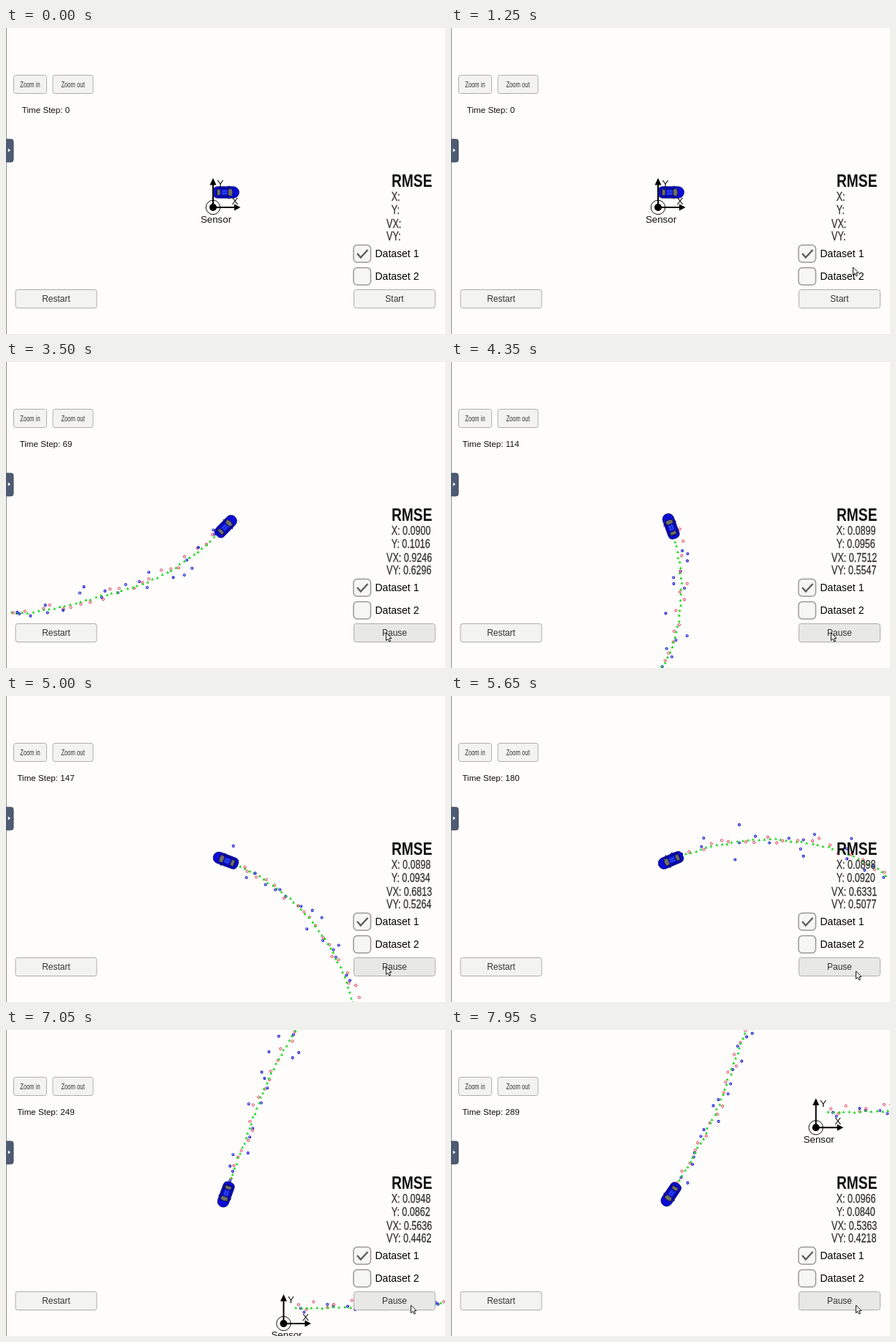
Animation of 600 by 418 pixels, one loop 8 s. Source, as an HTML page with a canvas:

```html
<!DOCTYPE html>
<html lang="en">
<head>
<meta charset="utf-8">
<title>Sensor fusion simulator</title>
<style>
  html, body { margin: 0; width: 100%; height: 100%; overflow: hidden; background: #fefdfc; }
  canvas { display: block; }
</style>
</head>
<body>
<canvas id="stage" width="600" height="418"></canvas>
<script>
const ctx = document.getElementById('stage').getContext('2d');
const LOOP = 8000, TICK = 50, STEPS = 289, SPEED = 7.35;
const CENTER = { x: 300, y: 224 }, START = { x: 17, y: 21 };
const SANS = '"Liberation Sans", Arial, sans-serif';
const PRESS = 2100, RUN = 2260;

// Steering: [time step, heading in degrees]
const HEADING = [
  [0, 0], [16, 4], [24, 0], [36, 15], [46, 15], [60, 37], [69, 46], [84, 48], [95, 80], [103, 91],
  [114, 110], [138, 146], [160, 179], [180, 203], [192, 230], [218, 238], [232, 250], [266, 250],
  [STEPS, 236]
];
// [ms, time step]
const CLOCK = [[RUN, 0], [3500, 69], [4350, 114], [5650, 180], [7050, 249], [7950, STEPS]];
// [time step, X, Y, VX, VY]
const ERRORS = [
  [5, .2336, .0748, 3.0487, 1.6587], [69, .0900, .1016, .9246, .6296],
  [180, .0898, .0920, .6331, .5077], [STEPS, .0966, .0840, .5363, .4218]
];
// [ms, x, y]
const POINTER = [[50, 547, 16], [850, 549, 250], [1500, 549, 375], [2050, 519, 370],
  [5250, 519, 370], [5500, 553, 376]];

function linear(table, at, col) {
  let i = 0;
  while (i < table.length - 2 && table[i + 1][0] <= at) i++;
  const a = table[i], b = table[i + 1];
  const u = Math.max(0, Math.min(1, (at - a[0]) / (b[0] - a[0])));
  return a[col] + (b[col] - a[col]) * u;
}

const heading = s => linear(HEADING, s, 1) * Math.PI / 180;

function random(seed) {
  const v = Math.sin(seed * 127.1 + 11.7) * 43758.5453;
  return v - Math.floor(v);
}
const gauss = seed => 2 * (random(seed) + random(seed + .31) + random(seed + .67) - 1.5);

// Position relative to the sensor at every step, y up.
const path = [START];
for (let s = 0; s < STEPS; s++) {
  const { x, y } = path[s], angle = heading(s + .5);
  path.push({ x: x + SPEED * Math.cos(angle), y: y + SPEED * Math.sin(angle) });
}

// Lidar and radar take turns; radar scatters more with distance.
const marks = path.map(({ x, y }, s) => {
  const radar = s % 2 === 1;
  const mark = { radar, x: x + .6 * gauss(s + 40), y: y + .6 * gauss(s + 70) };
  if (radar) {
    const range = Math.hypot(x, y) + 7 * gauss(s + 500);
    const bearing = Math.atan2(y, x) + .026 * gauss(s + 900);
    return { ...mark, mx: range * Math.cos(bearing), my: range * Math.sin(bearing) };
  }
  return { ...mark, mx: x + 3.4 * gauss(s + 200), my: y + 3.4 * gauss(s + 300) };
});

function text(str, x, y, size, { color = '#111', align = 'left', weight = '', squeeze = 1, bold = 0 } = {}) {
  ctx.save();
  ctx.translate(x, y);
  ctx.scale(squeeze, 1);
  ctx.font = `${weight} ${size}px ${SANS}`;
  ctx.textAlign = align;
  ctx.fillStyle = ctx.strokeStyle = color;
  ctx.fillText(str, 0, 0);
  if (bold) {
    ctx.lineWidth = bold;
    ctx.strokeText(str, 0, 0);
  }
  ctx.restore();
}

function paint(fill, stroke, width = 1) {
  if (fill) {
    ctx.fillStyle = fill;
    ctx.fill();
  }
  if (stroke) {
    ctx.strokeStyle = stroke;
    ctx.lineWidth = width;
    ctx.stroke();
  }
}

function box(x, y, w, h, r, ...style) {
  ctx.beginPath();
  ctx.roundRect(x, y, w, h, r);
  paint(...style);
}

function polygon(points, ...style) {
  ctx.beginPath();
  points.forEach(([x, y]) => ctx.lineTo(x, y));
  ctx.closePath();
  paint(...style);
}

function circle(x, y, r, ...style) {
  ctx.beginPath();
  ctx.arc(x, y, r, 0, 2 * Math.PI);
  paint(...style);
}

function polyline(points, color, width) {
  ctx.beginPath();
  points.forEach(([x, y]) => ctx.lineTo(x, y));
  paint(null, color, width);
}

function drawTrail(step, ox, oy) {
  for (const m of marks.slice(0, step)) {
    const x = ox + m.mx, y = oy - m.my;
    if (m.radar) {
      circle(x, y, 1.5, null, '#1c1cd0', 1.1);
      circle(x + .4, y + .3, .6, '#1c1cd0');
    } else {
      circle(x, y, 1.6, null, '#e4304e');
    }
    const gx = ox + m.x, gy = oy - m.y;
    polygon([[gx, gy - 2], [gx + 2, gy + 1.6], [gx - 2, gy + 1.6]], '#1fd81f');
  }
}

function drawCar(angle) {
  ctx.save();
  ctx.translate(CENTER.x + .5, CENTER.y + .5);
  ctx.rotate(-angle);
  for (const side of [-1, 1]) {
    polygon([[4, 7 * side], [3, 9.6 * side], [6, 8 * side]], '#10104a');
  }
  box(-17.5, -7.8, 35.5, 15.6, [6, 8, 8, 6], '#0b0bd6', '#0a0a60', .8);
  box(-13, -5.8, 22, 11.6, 3, '#0b0bbc', '#06065a', .7);
  polygon([[-12, -4.5], [-7.5, -3.6], [-7.5, 3.6], [-12, 4.5]], '#70706a', '#15151c', .6);
  polygon([[3.2, -4], [8, -5.4], [9.3, 0], [8, 5.4], [3.2, 4]], '#70706a', '#15151c', .6);
  box(-6, -3.8, 8, 7.6, 1.5, '#1525e2');
  for (const y of [-1.6, 1.6]) polyline([[-5, y], [2, y]], '#5878ee', .6);
  ctx.restore();
}

function drawSensor(x, y) {
  circle(x, y, 9.7, null, '#111');
  circle(x, y, 5, '#000');
  polyline([[x, y - 33], [x, y], [x + 32, y]], '#000', 2);
  polygon([[x, y - 40], [x + 4.5, y - 30.5], [x - 4.5, y - 30.5]], '#000');
  polygon([[x + 37.5, y], [x + 29, y - 4.5], [x + 29, y + 4.5]], '#000');
  text('Y', x + 10, y - 28, 13.5, { align: 'center' });
  text('X', x + 30, y - 4, 13.5, { align: 'center' });
  text('Sensor', x + 4, y + 20.5, 13.3, { align: 'center' });
}

function button(label, x, y, w, size, { squeeze = 1, fill = '#f3f3f2' } = {}) {
  box(x + .5, y + .5, w - 1, 25, 3, fill, '#aeaeae');
  text(label, x + w / 2, y + 17, size, { color: '#333', align: 'center', squeeze });
}

function checkbox(label, y, checked) {
  box(475, y + 1, 23.5, 23.5, 5, '#f6f6f5', '#999', 1.5);
  if (checked) polyline([[480, y + 12.5], [484.8, y + 18], [494.5, y + 7.5]], '#5c5c5c', 2.3);
  text(label, 504.5, y + 17, 14, { color: '#000' });
}

// The squared error sum grows steadily between the key steps.
function errorText(step, col) {
  if (step < 1) return '';
  const sums = ERRORS.map(row => [row[0], row[col] ** 2 * row[0]]);
  return ' ' + Math.sqrt(linear(sums, step, 1) / Math.max(step, 5)).toFixed(4);
}

function drawPanel(t, step) {
  polyline([[.5, 0], [.5, 418]], '#8f8f8f', 1);
  box(-4, 152, 14, 31, 3, '#4f5a73', '#3e475d');
  polygon([[2.8, 164.5], [6.2, 167], [2.8, 169.5]], '#fff');
  button('Zoom in', 10, 64, 46, 11, { squeeze: .69 });
  button('Zoom out', 63.5, 64, 56, 11, { squeeze: .69 });
  text('Time Step: ' + step, 54.5, 116, 11.6, { align: 'center' });

  text('RMSE', 527, 217, 24, { weight: 'bold', squeeze: .8 });
  [['X:', 526.7, 236], ['Y:', 526.7, 253.5], ['VX:', 520, 272.5], ['VY:', 520, 289.5]]
    .forEach(([label, x, y], i) =>
      text(label + errorText(step, i + 1), x, y, 16, { color: '#333', squeeze: .785, bold: .3 }));

  checkbox('Dataset 1', 295.5, true);
  checkbox('Dataset 2', 326.5, false);
  button('Restart', 12.5, 357, 112, 12);
  const pressed = t >= PRESS;
  button(pressed ? 'Pause' : 'Start', 475, 357, 112, 12, pressed ? { fill: '#e8e8e7' } : {});
}

function drawPointer(t) {
  if (t < TICK) return;
  ctx.save();
  ctx.translate(linear(POINTER, t, 1), linear(POINTER, t, 2));
  polygon([[.5, 0], [.5, 10.5], [3, 8.3], [4.8, 12], [6.5, 11.2], [4.8, 7.6], [8, 7.4]], '#fff', '#000', .9);
  ctx.restore();
}

function draw(now) {
  const t = Math.floor(now % LOOP / TICK) * TICK;
  const step = Math.floor(linear(CLOCK, t, 1) + .001);
  const car = path[step];
  const ox = CENTER.x - car.x, oy = CENTER.y + car.y;
  ctx.fillStyle = '#fefdfc';
  ctx.fillRect(0, 0, 600, 418);
  drawTrail(step, ox, oy);
  drawCar(heading(step));
  drawSensor(ox, oy);
  drawPanel(t, step);
  drawPointer(t);
}

function tick() {
  draw(performance.now());
  requestAnimationFrame(tick);
}
tick();
</script>
</body>
</html>
```
